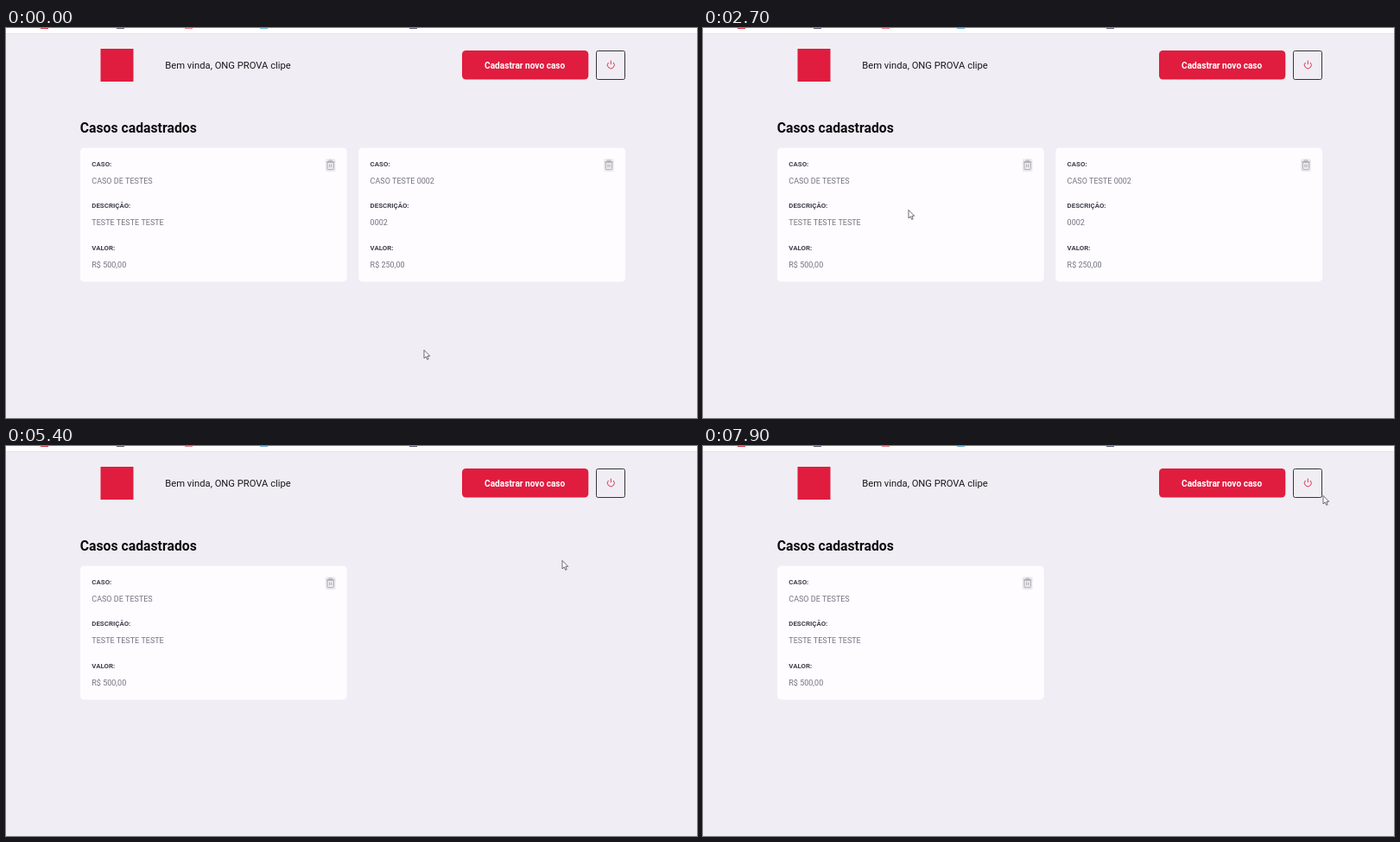
These frames come from a looping animation (800 px wide and 451 px high, 8000 ms). An HTML page with a canvas:

```html
<!DOCTYPE html>
<html lang="pt-BR">
<head>
<meta charset="utf-8">
<title>Casos cadastrados</title>
<style>
  html, body { margin: 0; width: 100%; height: 100%; overflow: hidden; background: #f0eef4; }
  canvas { display: block; width: 800px; height: 451px; }
</style>
</head>
<body>
<canvas id="stage" width="800" height="451"></canvas>
<script>
const ctx = document.getElementById('stage').getContext('2d');
const LOOP = 8000, STEP = 100, DELETED_AT = 4900;
const RED = '#e01d3f', INK = '#41414d', GREY = '#737380';

// Where the pointer rests or turns; it eases from one stop to the next
const STOPS = [
  { t: 0, x: 484, y: 372 },
  { t: 300, x: 466, y: 408 },
  { t: 1500, x: 86, y: 139 },
  { t: 2100, x: 668, y: 290 },
  { t: 2700, x: 238, y: 210 },
  { t: 3300, x: 745, y: 225 },
  { t: 3700, x: 350, y: 160 },
  { t: 4000, x: 659, y: 163 },
  { t: 4800, x: 697, y: 158 },
  { t: 5400, x: 644, y: 132 },
  { t: 6700, x: 206, y: 175 },
  { t: 7200, x: 120, y: 160 },
  { t: 7900, x: 718, y: 57 }
];

const ease = u => u * u * (3 - 2 * u);
const mix = (a, b, k) => a + (b - a) * k;

function pointerAt(t) {
  const i = STOPS.findIndex(s => s.t > t);
  const b = STOPS.at(i), a = i < 0 ? b : STOPS[i - 1];
  const k = a === b ? 1 : ease((t - a.t) / (b.t - a.t));
  return [mix(a.x, b.x, k), mix(a.y, b.y, k)];
}

function text(str, x, y, size, color, weight = 400) {
  ctx.font = `${weight} ${size}px Roboto, sans-serif`;
  ctx.fillStyle = color;
  ctx.fillText(str, x, y);
}

function box(x, y, w, h, r, color) {
  ctx.beginPath();
  ctx.roundRect(x, y, w, h, r);
  ctx.fillStyle = color;
  ctx.fill();
}

function outline(x, y, w, h, r) {
  ctx.beginPath();
  ctx.roundRect(x, y, w, h, r);
  ctx.stroke();
}

function pen(color, width) {
  ctx.strokeStyle = color;
  ctx.lineWidth = width;
}

function line(x1, y1, x2, y2) {
  ctx.beginPath();
  ctx.moveTo(x1, y1);
  ctx.lineTo(x2, y2);
  ctx.stroke();
}

function trash(x, y) {
  box(x - 6, y - 7, 12, 15, 2, '#ecebee');
  pen('#a4a4aa', 0.9);
  line(x - 4.7, y - 3.4, x + 4.7, y - 3.4);
  outline(x - 1.9, y - 5.3, 3.8, 1.9, 0.6);
  outline(x - 3.7, y - 3.4, 7.4, 8.8, 1);
  for (const dx of [-1.1, 1.1]) line(x + dx, y - 0.8, x + dx, y + 2.8);
}

function card(x, values) {
  box(x, 138.5, 308.7, 154.7, 4.5, '#fefcff');
  ['CASO:', 'DESCRIÇÃO:', 'VALOR:'].forEach((label, i) => {
    const y = 159.5 + 48.5 * i;
    text(label, x + 13.3, y, 7.9, INK, 700);
    text(values[i], x + 13.3, y + 20.4, 9, GREY);
  });
  trash(x + 289.7, 158.3);
}

function browserEdge() {
  box(0, 0, 800, 6, 0, '#fefefe');
  box(0, 6, 800, 1, 0, '#e6e4e9');
  const icons = { 40: '#d9364a', 128: '#5b6070', 207: '#e8808a', 294: '#6fb4dc', 467: '#566078' };
  for (const x in icons) box(+x, 0, 9, 1, 0, icons[x]);
}

function header() {
  box(109.5, 24, 38, 38, 0, RED);
  text('Bem vinda, ONG PROVA clipe', 184.3, 46.8, 11.22, '#17171b');
  box(528, 26, 146.3, 33.5, 4.5, RED);
  text('Cadastrar novo caso', 554, 46.5, 10.15, '#fff', 700);

  pen('#34343a', 1);
  outline(683.5, 26.5, 33, 33, 2);
  pen(RED, 0.9);
  ctx.beginPath();
  ctx.arc(700.3, 42.8, 4, -0.8, Math.PI + 0.8);
  ctx.stroke();
  line(700.3, 37.6, 700.3, 42.2);
}

const ARROW = new Path2D('M0 0V9.6L2.2 7.6 3.7 11 5.2 10.4 3.8 7.1 6.7 6.9Z');

function pointer(x, y) {
  ctx.save();
  ctx.translate(x, y + 0.4);
  ctx.fillStyle = '#fff';
  ctx.fill(ARROW);
  pen('#48484e', 0.8);
  ctx.stroke(ARROW);
  ctx.restore();
}

function draw(now) {
  const t = Math.floor((now % LOOP) / STEP) * STEP;
  box(0, 0, 800, 451, 0, '#f0eef4');
  browserEdge();
  header();
  text('Casos cadastrados', 85.7, 121.2, 15.75, '#0c0c10', 700);
  card(86, ['CASO DE TESTES', 'TESTE TESTE TESTE', 'R$ 500,00']);
  if (t < DELETED_AT) card(408.3, ['CASO TESTE 0002', '0002', 'R$ 250,00']);
  pointer(...pointerAt(t));
}

let start;
function tick(now) {
  start ??= now;
  draw(Math.max(0, now - start));
  requestAnimationFrame(tick);
}
draw(0);
requestAnimationFrame(tick);
</script>
</body>
</html>
```
